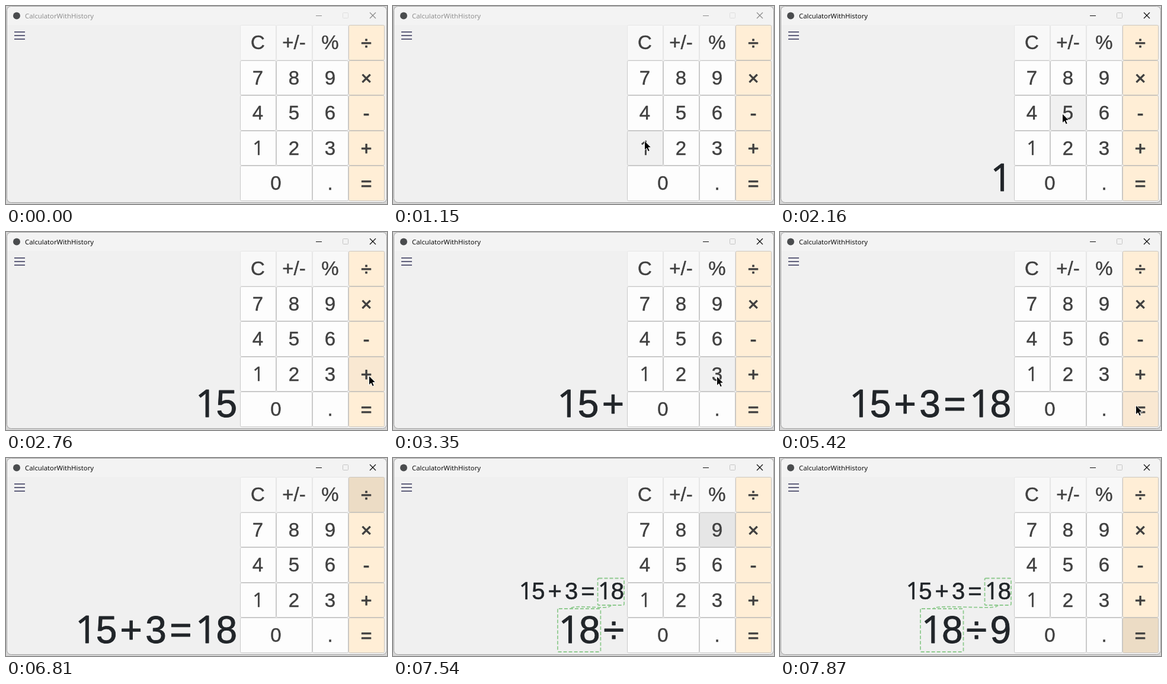
An HTML page with a canvas for the animation above (8 s loop, 643 px wide and 335 px high).

```html
<!DOCTYPE html>
<html lang="en">
<head>
<meta charset="utf-8">
<title>Calculator</title>
<style>
  html, body { margin: 0; width: 100%; height: 100%; overflow: hidden; background: #d4d4d4; }
  canvas { display: block; }
</style>
</head>
<body>
<canvas id="stage" width="643" height="335"></canvas>
<script>
const ctx = document.getElementById('stage').getContext('2d');
const LOOP = 8000;
const SANS = '"Liberation Sans", Arial, sans-serif';
const PLAIN_ONE = '"Open Sans", "Noto Sans", sans-serif';
const INK = '#212529';
const RIGHT = 390;

const COLS = [395, 456, 517, 578, 639];
const ROWS = [32, 92, 151, 211, 270, 330];
const LAYOUT = [
  ['C', '+/-', '%', '÷'],
  ['7', '8', '9', '×'],
  ['4', '5', '6', '-'],
  ['1', '2', '3', '+'],
  ['0', null, '.', '=']
];
const FILLS = {
  digit: { idle: '#fdfdfd', hover: '#f1f1f1', down: '#e6e6e6', edge: '#c9c9c9' },
  tool: { idle: '#f8f8f8', hover: '#f1f1f1', down: '#e6e6e6', edge: '#e6e6e6' },
  op: { idle: '#ffeed6', hover: '#f9e8d2', down: '#ecdcc5', edge: '#cbc6be' }
};

const keys = [];
LAYOUT.forEach((row, r) => row.forEach((label, c) => {
  if (!label) return;
  const end = label === '0' ? c + 2 : c + 1;
  const kind = c === 3 ? 'op' : r === 0 ? 'tool' : 'digit';
  keys.push({ label, kind, x: COLS[c], y: ROWS[r], w: COLS[end] - COLS[c], h: ROWS[r + 1] - ROWS[r] });
}));

const ACTIVE_AT = 1750;
const HISTORY_AT = 6940;
const CURSOR_GONE = 6550;

const DISPLAY = [
  [0, ''], [1890, '1'], [2290, '15'], [3090, '15+'], [3750, '15+3'],
  [4210, '15+3=18'], [6940, '18÷'], [7610, '18÷9']
];
const PRESSES = [
  ['1', 1750, 1890], ['+', 2960, 3090], ['3', 3620, 3750], ['=', 4080, 4210],
  ['÷', 6810, 6940], ['9', 7540, 7610], ['=', 7870, 8000]
];
// start, end, steps, target x, target y, easing power
const MOVES = [
  [810, 1150, 6, 424, 228, 1],
  [1950, 2160, 4, 476, 182, 1],
  [2490, 2760, 4, 612, 243, 1],
  [3150, 3350, 4, 546, 244, 1],
  [3820, 4010, 4, 604, 294, 1],
  [5420, 5620, 4, 364, 238, 3],
  [6410, 6480, 2, 425, 125, 1]
];

function cursorAt(t) {
  if (t < MOVES[0][0] || t >= CURSOR_GONE) return null;
  let x = 470, y = 345;
  for (const [start, end, steps, tx, ty, power] of MOVES) {
    if (t < start) break;
    const done = Math.floor((t - start) / (end - start) * (steps - 1) + 1e-6) + 1;
    const p = Math.min(1, done / steps) ** power;
    x += (tx - x) * p;
    y += (ty - y) * p;
  }
  return { x: Math.round(x), y: Math.round(y) };
}

function widthOf(str, size) {
  ctx.font = `${size}px ${SANS}`;
  return ctx.measureText(str).width;
}

// The digit 1 comes from a face where it has no foot; a thin outline adds weight.
function drawText(str, x, y, size, color, outline) {
  ctx.fillStyle = ctx.strokeStyle = color;
  ctx.lineWidth = outline;
  for (const ch of str) {
    const w = widthOf(ch, size);
    const one = ch === '1';
    if (one) ctx.font = `${size}px ${PLAIN_ONE}`;
    const left = one ? x + size * 0.015 : x;
    ctx.fillText(ch, left, y);
    ctx.strokeText(ch, left, y);
    x += w;
  }
}

// Right-aligned sum; returns the left edge of its first number.
function drawSum(sum, y, size, gap) {
  let x = RIGHT;
  const parts = sum.match(/\d+|\D/g) || [];
  for (let i = parts.length - 1; i >= 0; i--) {
    x -= widthOf(parts[i], size);
    drawText(parts[i], x, y, size, INK, size * 0.014);
    if (i > 0) x -= gap;
  }
  return x;
}

function line(x1, y1, x2, y2) {
  ctx.beginPath();
  ctx.moveTo(x1, y1);
  ctx.lineTo(x2, y2);
  ctx.stroke();
}

function box(x, y, w, h, r) {
  ctx.beginPath();
  ctx.roundRect(x, y, w, h, r);
}

function drawWindow(active) {
  ctx.fillStyle = '#d4d4d4';
  ctx.fillRect(0, 0, 643, 335);
  ctx.save();
  box(1.5, 0.5, 641, 332, 7);
  ctx.fillStyle = '#f0f0f0';
  ctx.fill();
  ctx.clip();
  ctx.fillStyle = '#f3f3f3';
  ctx.fillRect(0, 0, 643, 32);
  ctx.restore();
  box(1.5, 0.5, 641, 332, 7);
  ctx.lineWidth = 1;
  ctx.strokeStyle = '#a0a0a0';
  ctx.stroke();

  ctx.fillStyle = '#4a4c4e';
  ctx.beginPath();
  ctx.arc(18, 16.5, 6, 0, Math.PI * 2);
  ctx.fill();

  ctx.fillStyle = active ? '#000' : '#8a8a8a';
  ctx.font = '11.4px "Open Sans", "Noto Sans", sans-serif';
  ctx.fillText('CalculatorWithHistory', 32, 21);

  ctx.strokeStyle = active ? '#111' : '#8c8c8c';
  line(523, 16.5, 533, 16.5);
  ctx.lineWidth = 1.2;
  line(614, 11, 624, 21);
  line(624, 11, 614, 21);
  ctx.lineWidth = 1;
  ctx.strokeStyle = active ? '#c4c4c4' : '#dedede';
  box(568.5, 11.5, 9, 9, 1);
  ctx.stroke();

  ctx.fillStyle = '#5f5f7b';
  for (const y of [43, 49, 55]) ctx.fillRect(14, y, 18, 2);
}

function drawKey(key, state) {
  const fills = FILLS[key.kind];
  box(key.x + 0.5, key.y + 0.5, key.w - 1, key.h - 1, 2);
  ctx.fillStyle = fills[state];
  ctx.fill();
  ctx.lineWidth = 1;
  ctx.strokeStyle = fills.edge;
  ctx.stroke();
  const size = key.kind === 'op' ? 32 : 33;
  const x = key.x + (key.w - widthOf(key.label, size)) / 2 - 0.5;
  const y = Math.round(key.y + key.h / 2 + 11.4);
  drawText(key.label, x, y, size, '#404040', key.kind === 'op' ? 1 : 0.45);
}

function drawLink(left) {
  const a = left + 21;
  const mid = (368 + a) / 2;
  ctx.strokeStyle = '#8fca8f';
  ctx.lineWidth = 1.8;
  ctx.setLineDash([6, 3]);
  box(345.5, 203.5, 44.5, 45.5, 2);
  ctx.stroke();
  box(left - 0.5, 255, 72.5, 73, 2);
  ctx.stroke();
  ctx.beginPath();
  ctx.moveTo(368, 249);
  ctx.bezierCurveTo(366, 254, 350, 253, mid + 10, 252.5);
  ctx.bezierCurveTo(mid - 15, 252, a + 4, 250, a, 255);
  ctx.stroke();
  ctx.setLineDash([]);
}

function drawCursor({ x, y }) {
  const shape = [[0, 0], [0, 16], [3.6, 12.7], [6, 18.2], [8.8, 17], [6.4, 11.6], [11.2, 11.4]];
  ctx.beginPath();
  shape.forEach(([dx, dy]) => ctx.lineTo(x + 0.5 + dx, y + dy));
  ctx.closePath();
  ctx.fillStyle = '#000';
  ctx.fill();
  ctx.strokeStyle = '#fff';
  ctx.lineWidth = 1;
  ctx.stroke();
}

function draw(t) {
  const cursor = cursorAt(t);
  const over = k => cursor && cursor.x >= k.x && cursor.x < k.x + k.w &&
    cursor.y >= k.y && cursor.y < k.y + k.h;
  const down = k => PRESSES.some(([label, from, to]) => label === k.label && t >= from && t < to);

  drawWindow(t >= ACTIVE_AT);
  for (const key of keys) drawKey(key, down(key) ? 'down' : over(key) ? 'hover' : 'idle');

  const sum = DISPLAY.filter(([from]) => t >= from).pop()[1];
  const left = drawSum(sum, 313, 64, 5.3);
  if (t >= HISTORY_AT) {
    drawSum('15+3=18', 239, 40, 5);
    drawLink(left);
  }
  if (cursor) drawCursor(cursor);
}

ctx.lineJoin = 'round';
function tick() {
  draw(performance.now() % LOOP);
  requestAnimationFrame(tick);
}
tick();
</script>
</body>
</html>
```
